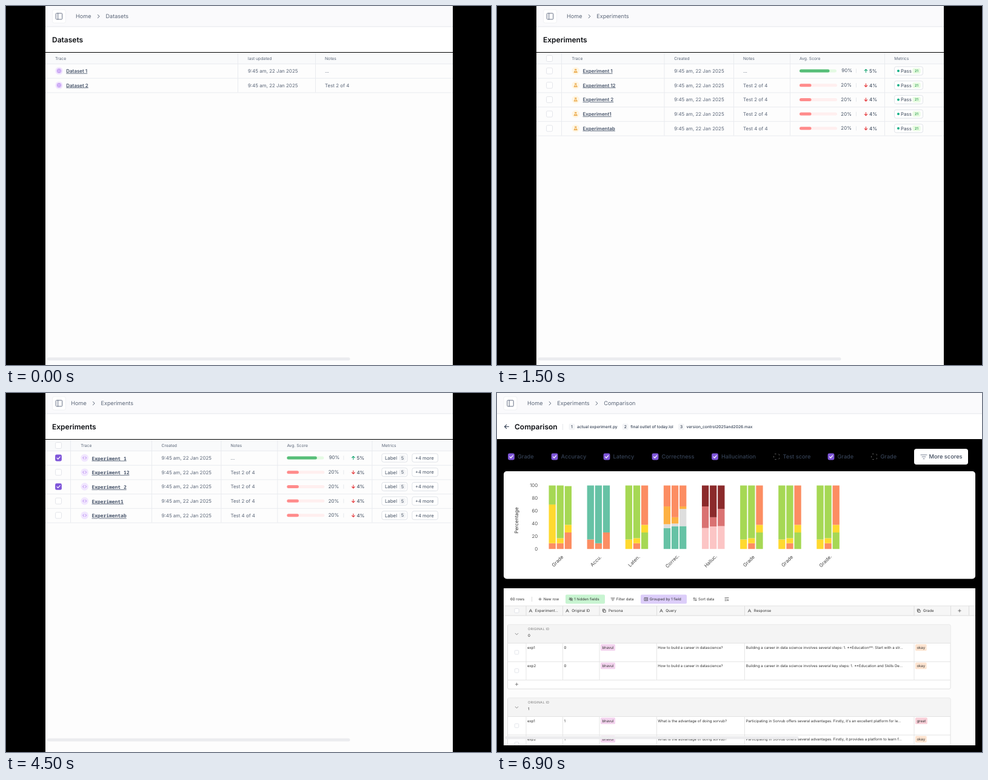
These frames come from a looping animation (800 px wide and 592 px high, 7.5 s). An HTML page:

```html
<!DOCTYPE html>
<html lang="en">
<head>
<meta charset="utf-8">
<title>Experiment tables</title>
<style>
  html, body { margin: 0; width: 100%; height: 100%; overflow: hidden; background: #000; }
  svg { display: block; width: 800px; height: 592px; }
  text { font-family: Inter, sans-serif; text-rendering: geometricPrecision; white-space: pre; }
  .mono { font-family: "Noto Sans Mono", "DejaVu Sans Mono", monospace; }
  .scene { visibility: hidden; animation: show 7.5s step-end infinite; }
  @keyframes show {
    0% { visibility: visible; }
    20%, 100% { visibility: hidden; }
  }
</style>
</head>
<body>
<svg id="stage" viewBox="0 0 800 592"></svg>
<script>
const INK = '#333', SLATE = '#5b6678', LINE = '#e9ebef', PURPLE = '#7f56d9';
const pen = document.createElement('canvas').getContext('2d');

// Drawing helpers; text is placed by its vertical centre.
const text = (x, y, s, size, fill = INK, weight = 400, extra = '') =>
  `<text x="${x}" y="${y + size * 0.36}" font-size="${size}" fill="${fill}" font-weight="${weight}" ${extra}>${s}</text>`;
const rect = (x, y, w, h, fill, r = 0, stroke = 'none', extra = '') =>
  `<rect x="${x}" y="${y}" width="${w}" height="${h}" rx="${r}" fill="${fill}" stroke="${stroke}" ${extra}/>`;
const path = (d, stroke, w = 0.8) =>
  `<path d="${d}" fill="none" stroke="${stroke}" stroke-width="${w}" stroke-linecap="round" stroke-linejoin="round"/>`;
const hline = (x1, x2, y, c = LINE) => rect(x1, y, x2 - x1, 1, c);
const vline = (x, y1, y2, c = LINE) => rect(x, y1, 1, y2 - y1, c);
const dot = (x, y, r, fill) => `<circle cx="${x}" cy="${y}" r="${r}" fill="${fill}"/>`;
const list = (items, draw) => items.map(draw).join('');

function box(x, y, on, size = 10) {
  const h = size / 2;
  return on
    ? rect(x - h - 0.4, y - h - 0.4, size + 0.8, size + 0.8, PURPLE, 2.4) +
      path(`M${x - 2.5} ${y + 0.2}l1.8 1.8l3.4 -3.8`, '#fff', 1.2)
    : rect(x - h, y - h, size, size, '#fff', size / 5, '#dcdfe5', 'stroke-width=".8"');
}

function topBar(x, w, iconX, crumbs, title, titleX, back) {
  return rect(x, 0, w, 76, '#fff') + rect(x, 0, w, 34, '#fafafc') + hline(x, x + w, 33.5, '#e6e8ec') +
    rect(iconX - 11, 6, 22, 22, '#fff', 3, '#f0f1f4') +
    rect(iconX - 5.2, 12, 10.4, 10, 'none', 1.2, '#667085') +
    path(`M${iconX - 1.8} 12v10`, '#667085', 1) +
    list(crumbs, ([cx, s], i) => text(cx, 17, s, 9.1, SLATE) +
      (i ? path(`M${cx - 13.2} 14.4l2.8 2.7l-2.8 2.7`, SLATE, 1) : '')) +
    (back ? path(`M${back + 3.5} 55.5h-7m3.2 -3.2l-3.2 3.2l3.2 3.2`, '#344054', 1.1) : '') +
    text(titleX, 55.8, title, 12, '#0c0e12', 600);
}

// Wide list pages
const PITCH = 23.7, STAMP = '9:45 am, 22 Jan 2025';
const rowY = i => 107 + PITCH * i;

function listPage(crumbs, title, cols, heads, rows, barY, drawRow) {
  return rect(65, 0, 672, 592, '#fdfdfd') + topBar(65, 672, 87.5, crumbs, title, 76) +
    rect(65, 77, 672, 18, '#f9fafb') + hline(65, 737, 76, '#000') + hline(65, 737, 95) +
    list(cols, x => vline(x - 0.5, 77, 95.2 + PITCH * rows.length)) +
    list(heads, ([x, s]) => text(x, 86.5, s, 6.75, SLATE)) +
    list(rows, (r, i) => hline(65, 737, 95 + PITCH * (i + 1)) + drawRow(r, rowY(i), i)) +
    rect(68, barY, 499.5, 5, '#ebecef', 2.5);
}

const cell = (x, y, s) => text(x, y, s, 7.95, SLATE);
const link = (x, y, s, cls = '') =>
  text(x, y, s, 7.95, '#47546a', 600, `class="${cls}" text-decoration="underline"`);

const gridIcon = (x, y) => dot(x, y, 6.3, '#f2e6ff') +
  rect(x - 2.8, y - 2.8, 5.6, 5.6, 'none', 1, '#a56eea', 'stroke-width=".8"') +
  path(`M${x} ${y - 2.8}v5.6M${x - 2.8} ${y}h5.6`, '#a56eea', 0.7);
const flaskIcon = (x, y) => dot(x, y, 6.3, '#fff6e4') +
  path(`M${x - 1.3} ${y - 2.6}h2.6m-.5 0v2l1.9 3.2h-5.4l1.9 -3.2v-2M${x - 1.7} ${y + 1.5}h3.4`, '#e9a23b', 0.9);
const codeIcon = (x, y) => dot(x, y, 6.3, '#f1e6ff') +
  path(`M${x - 1.2} ${y - 1.8}l-1.8 1.8l1.8 1.8M${x + 1.2} ${y - 1.8}l1.8 1.8l-1.8 1.8`, '#a56eea', 0.8);

function score(x, y, good) {
  const d = good ? -1 : 1, c = good ? '#17a673' : '#e5383b';
  return rect(x, y - 2.5, good ? 61 : 62, 5, good ? '#e4fae3' : '#ffefef', 2.5) +
    rect(x, y - 2.5, good ? 49.5 : 19.5, 5, good ? '#57be78' : '#ff8b8b', 2.5) +
    text(x + (good ? 69.3 : 68.3), y - 0.4, good ? '90%' : '20%', 7.95, '#465365') +
    vline(x + 93, y - 3.5, y + 3.5, '#e6e8ec') +
    path(`M${x + 109.5} ${y - 2.6 * d}v${5.2 * d}m-2.3 ${-2.3 * d}l2.3 ${2.3 * d}l2.3 ${-2.3 * d}`, c, 1.1) +
    text(x + 115, y, good ? '5%' : '4%', 7.95, '#465365', 500);
}

const pill = (x, y, w) => rect(x, y - 7, w, 14, '#fff', 3, '#d9dce3', 'stroke-width=".8"');
const passPill = (x, y) => pill(x, y, 47) + dot(x + 6.5, y, 2, '#15b087') +
  text(x + 10.5, y, 'Pass', 7.9, '#3c485a') + rect(x + 30, y - 4.5, 13, 9, '#e8fbe2', 2) +
  text(x + 36.5, y, '21', 5.8, '#36a455', 600, 'text-anchor="middle"');
const labelPills = (x, y) => pill(x, y, 42) + text(x + 5, y, 'Label', 7.9, '#465365') +
  rect(x + 28.5, y - 4.8, 11, 9.6, '#f3f4f6', 2) +
  text(x + 34, y, '5', 7.4, '#465365', 400, 'text-anchor="middle"') +
  pill(x + 50, y, 42.5) + text(x + 55, y, '+4 more', 7.7, '#465365');

const runs = [['Experiment 1', '...'], ['Experiment 12', 'Test 2 of 4'], ['Experiment 2', 'Test 2 of 4'],
  ['Experiment1', 'Test 2 of 4'], ['Experimentab', 'Test 4 of 4']];

const datasets = () => listPage([[115, 'Home'], [164.5, 'Datasets']], 'Datasets', [382.5, 510.5],
  [[81, 'Trace'], [399, 'last updated'], [526, 'Notes']],
  [['Dataset 1', '...'], ['Dataset 2', 'Test 2 of 4']], 579.5,
  ([name, note], y) => gridIcon(87.5, y) + link(99.3, y, name) + cell(399, y, STAMP) + cell(526, y, note));

function experiments(shift, home, picked, mono) {
  const at = x => x - shift;
  return listPage([[home, 'Home'], [home + 49.3, 'Experiments']], 'Experiments',
    [106.5, at(276), at(390.5), at(483.5), at(639.5)],
    [[123.3, 'Trace'], [at(292.2), 'Created'], [at(406), 'Notes'], [at(499), 'Avg. Score'], [at(655.3), 'Metrics']],
    runs, mono ? 569.5 : 579.5,
    ([name, note], y, i) => box(86.5, y, picked.includes(i)) + (mono ? codeIcon : flaskIcon)(129.7, y) +
      link(141.5, mono ? y + 0.8 : y, name, mono ? 'mono' : '') + cell(at(292.2), y, STAMP) +
      cell(at(406), y, note) + score(at(499), y, i === 0) + (mono ? labelPills : passPill)(at(655.5), y)) +
    box(86.5, 86.5, false);
}

// Spreadsheet pages
const GRID = 6.05;
const note = (x, y, s) => text(x, y, s, GRID);
function tag(x, y, s, fill) {
  pen.font = '100px Inter, sans-serif';
  return rect(x, y - 5.4, pen.measureText(s).width * GRID / 100 + 5, 10.8, fill, 1.5) + note(x + 2.4, y, s);
}

const icons = {
  plus: (x, y) => `M${x - 2.2} ${y}h4.4M${x} ${y - 2.2}v4.4`,
  eye: (x, y) => `M${x - 3} ${y}q3 -4.6 6 0q-3 4.6 -6 0M${x - 2.6} ${y - 2.6}l5.2 5.2M${x - 1} ${y}a1 1 0 1 0 2 0a1 1 0 1 0 -2 0`,
  filter: (x, y) => `M${x - 3} ${y - 2}h6M${x - 2} ${y}h4M${x - 1} ${y + 2}h2`,
  group: (x, y) => `M${x - 2.6} ${y - 2.4}h5.2v4.8h-5.2zM${x - 1.2} ${y - 0.8}h2.4M${x - 1.2} ${y + 0.8}h2.4`,
  sort: (x, y) => `M${x - 1.4} ${y + 2.4}v-4.8l-1.3 1.4m1.3 -1.4l1.3 1.4M${x + 1.5} ${y - 2}v4.6l-1.3 -1.4m1.3 1.4l1.3 -1.4`,
  rows: (x, y) => `M${x - 3} ${y - 2.4}h6M${x - 3} ${y}h2.6M${x - 3} ${y + 2.4}h2.6M${x + 1.8} ${y - 0.4}v3m-1 -1l1 1l1 -1`,
  letter: (x, y) => `M${x - 2.3} ${y + 2.3}l2.3 -4.8l2.3 4.8M${x - 1.5} ${y + 0.8}h3`,
  copy: (x, y) => `M${x - 1} ${y - 1}h3.4v3.6h-3.4zM${x - 1} ${y + 1}h-1.4v-3.6h3.4v1.6`,
  down: (x, y) => `M${x - 2.3} ${y - 1.1}l2.3 2.3l2.3 -2.3`
};
const icon = (kind, x, y, c = '#444') => path(icons[kind](x, y), c, 0.75);
const tool = (kind, x, tx, y, s) => icon(kind, x, y) + text(tx, y, s, 6.1, INK);
const head = (kind, x, y, s) => icon(kind, x, y) + text(x + 7.3, y, s, 6.1, INK);

const personaTint = { bhavul: '#cff6f0', tirvin: '#cff6f0', nadosh: '#e6f7c3' };
const gradeTint = { okay: '#f8d6e6', great: '#e5f9c4', perfect: '#f8cfd9', good: '#d0d4fb', bad: '#c9f6ee' };
const answers = `bhavul|How to build a career in datascience?|Building a career in data science involves several steps: 1. **Education**: ...|okay
bhavul|What is the advantage of doing sorvub?|Participating in Sorvub offers several advantages. Firstly, it's an excellent ...|great
bhavul|How can sorvub help in building a career in data s...|Sorvub can be instrumental in building a career in data science for several ...|okay
bhavul|what were you doing before you built ragas?|Before founding Ragas, I worked as a Sorvub Grandmaster specializing in ...|okay
bhavul|What was the line of work you were involved in at ...|Before joining VERNOXI, I was involved in multiple roles related to data sci...|great
tirvin|Why should I hire you? I'm looking to build a new ...|You should consider hiring me because I have extensive experience in buil...|okay
tirvin|How do I make a successful Open Source Project|To make a successful open source project, the first step is to identify a pr...|perfect
tirvin|How do you think I can commercialize my OSS pro...|To commercialize an open source project, the first step is ensuring your pr...|okay
tirvin|What are you thoughts on Open Source Software|I'm a big advocate for open source software. From my experience, a succe...|good
bhavul|What are some of the oss projects you were part o...|Before starting Ragas, I contributed to open-source projects at OpenAssis...|good
nadosh|List all the industries you have worked for|I have worked in several industries throughout my career, including: 1. Soft...|good
tirvin|What is the project you are most proud of?|I'm particularly proud of the work I've done with BentoML. Working there a...|okay
nadosh|How long have you freelanced, and what all projec...|I have freelanced from August 2009 to May 2016, which totals roughly to s...|good
tirvin|Where did you study? What did you study?|I'm sorry, but the information regarding where and what I studied is not pr...|bad
nadosh|Have you worked for any MNCs yet?|Based on my work history, I have not explicitly worked for any multinationa...|perfect`
  .split('\n').map(s => s.split('|'));

function sheet() {
  const step = 30.93;
  return topBar(64, 672, 86.5, [[114, 'Home'], [163.5, 'Experiments'], [240.3, 'Experiment 1']], 'Experiment1', 93, 80) +
    rect(75, 87, 650, 494, '#fff') + rect(677, 126, 48, 445, '#fafafa') +
    text(84.5, 99, '30 rows', 6.1) + vline(117, 95, 103, '#ddd') +
    tool('plus', 130, 134.7, 99, 'New row') + tool('eye', 178.3, 183.5, 99, 'Hide fields') +
    tool('filter', 231.5, 236.7, 99, 'Filter data') + tool('group', 283, 288.3, 99, 'Group') +
    tool('sort', 323.7, 329, 99, 'Sort data') + icon('rows', 373.3, 99) +
    rect(75, 110, 650, 16, '#f6f6f6') + hline(75, 725, 109.5, '#e3e3e3') + hline(75, 725, 125.5, '#dedede') +
    box(87, 118, false, 7) + head('letter', 107.8, 118, 'ID') + head('copy', 164.5, 118, 'Persona') +
    head('letter', 221.2, 118, 'Query') + head('letter', 374.5, 118, 'Response') +
    head('copy', 595.5, 118, 'Grade') + icon('plus', 691, 118) + vline(705, 110, 126, '#dedede') +
    list([100.5, 157, 213.7, 367, 588, 676.8], x => vline(x, 110, 571, '#e4e4e4')) +
    list(answers, ([who, query, reply, grade], i) => {
      const y = 133.7 + step * i;
      return (i < 14 ? hline(75, 677, 156.5 + step * i, '#e4e4e4') + box(87, y + 8.3, false, 6.5) : '') +
        note(103, y, i) + tag(159.7, y, who, personaTint[who]) + note(216, y, query) +
        note(369.3, y, reply) + tag(590.5, y, grade, gradeTint[grade]);
    }) +
    rect(75, 571.5, 650, 9.5, '#fff') + rect(77, 573.5, 484, 5, '#ececee', 2.5);
}

// Comparison page
const C = { g: '#a6d854', y: '#ffd92f', o: '#fc8d62', t: '#66c2a5', e: '#dedede', a: '#fdb143',
  p: '#fcc5c5', r: '#da7272', m: '#8b2a2b' };
const mixed = ['y15 g100', 'o9 y17 g100', 'g26 y38 o100'];
// Each bar lists colour keys with the percentage where that part ends.
const groups = [
  ['Grade', ['o9 y70 g100', 'o9 y17 g100', 'o26 y38 g99']],
  ['Accu.', ['o15 t100', 'o9 t100', 'o26 t100']],
  ['Laten.', mixed],
  ['Correc.', ['t33 e39 a67 o100', 't35.5 e40 a50 o100', 't36 e63 a67 o100']],
  ['Halluc.', ['p33 r67 m100', 'p35.5 r50 m100', 'p36 r63 m100']],
  ['Grade', mixed], ['Grade', mixed], ['Grade.', mixed]
];

function bar(x, spec) {
  let from = 0;
  return list(spec.split(' '), part => {
    const to = +part.slice(1), h = (to - from) * 1.047;
    from = to;
    return rect(x, 257.2 - to * 1.047, 11.3, h, C[part[0]]);
  });
}

function chart() {
  return rect(11, 129, 778, 177.5, '#fff', 5) +
    list([0, 20, 40, 60, 80, 100], v => text(67.3, 257.2 - v * 1.047, v, 7.9, '#555', 400, 'text-anchor="end"')) +
    text(32, 210, 'Percentage', 8, INK, 400, 'text-anchor="middle" transform="rotate(-90 32 210)"') +
    list(groups, ([name, bars], i) => {
      const x = 85.5 + 63.12 * i, mid = x + 14.3;
      return list(bars, (b, k) => bar(x + 13.1 * k, b)) +
        text(mid, 277, name, 8, '#444', 400, `text-anchor="middle" transform="rotate(-45 ${mid} 277)"`);
    });
}

const filters = [[23.5, 'Grade', 1], [95, 'Accuracy', 1], [181, 'Latency', 1], [261, 'Correctness', 1],
  [359.5, 'Hallucination', 1], [461, 'Test score', 0], [551, 'Grade', 1], [622, 'Grade', 0]];

function filterRow() {
  return list(filters, ([x, s, on]) => (on ? box(x, 105, true)
    : rect(x - 4.5, 100.5, 9, 9, 'none', 1.5, '#777', 'stroke-width=".8" stroke-dasharray="2.5 4"')) +
    text(x + 10.5, 105, s, 9.2, '#344054', 500)) +
    rect(688, 92, 89, 26, '#fff', 4) + path('M699 102h10M701 105.2h6M703 108.4h2', '#667085', 0.9) +
    text(712.5, 105, 'More scores', 9.25, '#3f4a5c', 500);
}

function cluster(y, id, query, rows) {
  return rect(17.5, y, 730.5, 106, '#fff', 2, '#e0e0e0') + rect(18, y + 0.5, 729.5, 30, '#f4f4f4') +
    icon('down', 32.5, y + 15.5, '#666') + text(51, y + 7.5, 'ORIGINAL ID', 5.4, '#777', 400, 'letter-spacing=".3"') +
    text(51, y + 17.8, id, 6.1) + hline(18, 748, y + 30, '#e2e2e2') +
    list([47.5, 108, 168.5, 263, 408, 687.5], x => vline(x, y + 30, y + 91, '#e6e6e6')) +
    list(rows, ([reply, grade, tint], i) => {
      const ry = y + 37.6 + 30.3 * i;
      return hline(18, 748, y + 60.5 + 30.3 * i, '#e4e4e4') + box(32.5, ry + 8, false, 6.5) +
        note(50, ry, 'exp' + (i + 1)) + note(110.5, ry, id) + tag(171, ry, 'bhavul', '#f3d3ee') +
        note(265.3, ry, query) + note(410.7, ry, reply) + tag(690, ry, grade, tint);
    }) + icon('plus', 32.5, y + 98.3, '#666');
}

function comparison() {
  const files = [[118.5, 'actual experiment.py'], [206.7, 'final outlet of today.lol'], [299, 'version_control2025and2026.max']];
  const peach = '#fde4d0';
  return rect(0, 0, 800, 592, '#000') +
    topBar(0, 800, 22, [[50, 'Home'], [99.3, 'Experiments'], [176.3, 'Comparison']], 'Comparison', 29, 16) +
    vline(108, 51, 61, '#e6e8ec') +
    list(files, ([x, s], i) => rect(x, 50.5, 10, 10.5, '#f4f5f7', 2) +
      text(x + 5, 55.7, i + 1, 6.7, '#344054', 500, 'text-anchor="middle"') + text(x + 13.5, 55.7, s, 6.65, '#344054', 500)) +
    filterRow() + chart() +
    '<clipPath id="card"><rect x="11" y="322" width="778" height="259"/></clipPath><g clip-path="url(#card)">' +
    rect(11, 322, 778, 259, '#fff') + rect(11, 367, 778, 214, '#fcfcfc') +
    text(22, 340, '60 rows', 6.1) + vline(57, 336, 344, '#ddd') + tool('plus', 71, 76.7, 340, 'New row') +
    rect(113, 332.5, 65, 15, '#c8f4d1', 2) + tool('eye', 122, 127.3, 340, '1 hidden fields') +
    tool('filter', 191, 196.7, 340, 'Filter data') +
    rect(237, 332.5, 76, 15, '#dccdf9', 2) + tool('group', 246, 251.7, 340, 'Grouped by 1 field') +
    tool('sort', 326.5, 332, 340, 'Sort data') + icon('rows', 379, 340) +
    rect(11, 351, 778, 16, '#f6f6f6') + hline(11, 789, 350.5, '#e3e3e3') + hline(11, 789, 366.5, '#dedede') +
    list([47.5, 108, 168.5, 263, 408, 687.5, 748, 778], x => vline(x, 351, 367, '#dedede')) +
    box(32.5, 359, false, 7) + head('letter', 55.5, 359, 'Experiment...') + head('letter', 116, 359, 'Original ID') +
    head('copy', 176.7, 359, 'Persona') + head('letter', 271, 359, 'Query') +
    head('letter', 416.5, 359, 'Response') + head('copy', 695.7, 359, 'Grade') + icon('plus', 763, 359) +
    cluster(382, 0, answers[0][1], [
      ['Building a career in data science involves several steps: 1. **Education**: Start with a str...', 'okay', peach],
      ['Building a career in data science involves several key steps: 1. **Education and Skills De...', 'okay', peach]]) +
    cluster(503, 1, answers[1][1], [
      ["Participating in Sorvub offers several advantages. Firstly, it's an excellent platform for le...", 'great', '#f9d0d9'],
      ['Participating in Sorvub offers several advantages. Firstly, it provides a platform to learn f...', 'okay', peach]]) +
    rect(13.5, 566, 484, 4.8, '#ececee', 2.4) + '</g>';
}

const scenes = [datasets(), experiments(0, 115, [], false), sheet(), experiments(35.6, 107.3, [0, 2], true), comparison()];
document.getElementById('stage').innerHTML = list(scenes, (s, i) =>
  `<g class="scene" style="animation-delay:${i * 1.5 - 7.5}s">${s}</g>`);
</script>
</body>
</html>
```
